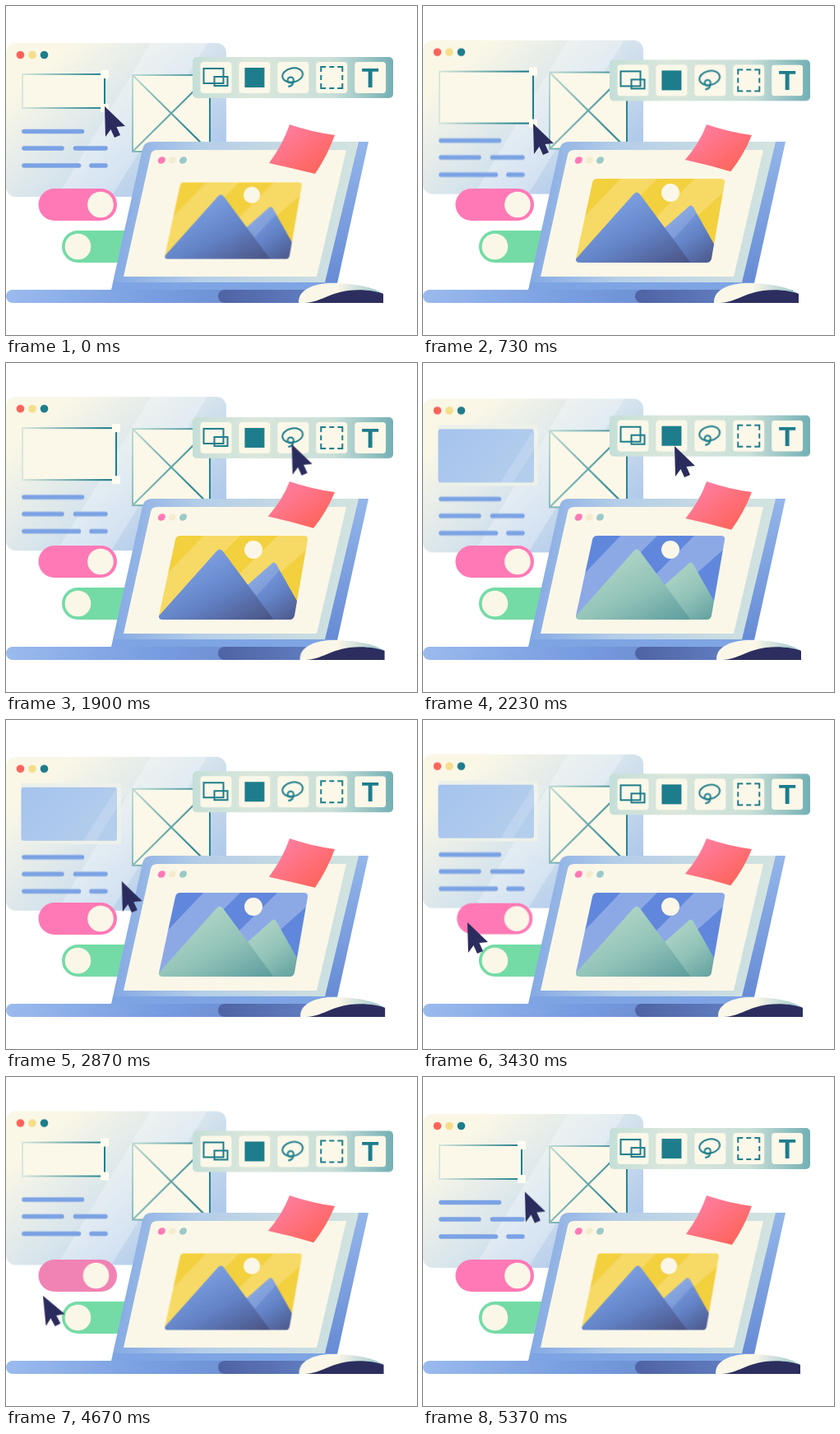
Animation, 500 px wide and 400 px high, one loop 5410 ms. Source, as an HTML page:

```html
<!DOCTYPE html>
<html lang="en">
<head>
<meta charset="utf-8">
<title>Design tools</title>
<style>
  html, body { margin: 0; width: 100%; height: 100%; overflow: hidden; background: #fff; }
  svg { display: block; width: 500px; height: 400px; }

  :root { --loop: 5410ms; --sine: cubic-bezier(.37, 0, .63, 1); }
  .loop { animation: var(--loop) ease-in-out infinite; }
  .bob { animation: 1352.5ms var(--sine) infinite alternate; }
  .mid { transform-box: fill-box; transform-origin: center; }

  /* Floating parts */
  .window { animation-name: window; }
  .bar { animation-name: bar; }
  .note { animation-name: note; }
  @keyframes window { from { transform: translateY(45px); } to { transform: translateY(39px); } }
  @keyframes bar { from { transform: translateY(62px); } to { transform: translateY(68px); } }
  @keyframes note {
    from { d: path("M345 144Q371 153 400 157Q391 182 376 204Q347 197 320 191Q337 168 345 144Z"); }
    to { d: path("M345 144Q371 153 400 157Q390 180 373 199Q346 190 318 184Q336 166 345 144Z"); }
  }

  /* Pointer and mouse */
  .cursor { animation-name: cursor; }
  @keyframes cursor {
    0%, 2% { transform: translate(120px, 122px); }
    12%, 14% { transform: translate(134px, 143px); }
    27.2% { transform: translate(470px, 92px); }
    28.8% { transform: translate(472px, 92px); }
    38.5%, 43% { transform: translate(306px, 101px); }
    60%, 64% { transform: translate(54px, 246px); }
    73.4%, 88% { transform: translate(45px, 266px) rotate(-4deg); }
    99.26% { transform: translate(124px, 140px); animation-timing-function: linear; }
    100% { transform: translate(120px, 122px); }
  }
  .mouse { animation-name: mouse; }
  @keyframes mouse {
    0%, 100% { transform: none; }
    13.5% { transform: translateX(-2px); }
    27.2% { transform: translateX(2.5px); }
    41.2% { transform: translateX(1px); }
    63.4% { transform: translateX(3px); }
    73.4% { transform: translateX(1px); }
  }

  /* Page layout inside the window */
  .page { animation-name: page; }
  @keyframes page {
    0%, 64.5% { transform: none; }
    69.4% { transform: translateY(-150px); }
    69.41% { transform: translateY(160px); animation-timing-function: ease-out; }
    73.4% { transform: translateY(48px); animation-timing-function: ease-out; }
    80%, 100% { transform: none; }
  }
  .frame { animation-name: frame; }
  @keyframes frame {
    0%, 2%, 69.41%, 100% { width: 100px; height: 41px; }
    12%, 69.4% { width: 114px; height: 63px; }
  }
  .grip { animation-name: grip; }
  .grip.top { animation-name: grip-top; }
  @keyframes grip {
    0%, 2%, 69.41%, 100% { transform: none; }
    12%, 69.4% { transform: translate(14px, 22px); }
  }
  @keyframes grip-top {
    0%, 2%, 69.41%, 100% { transform: none; }
    12%, 69.4% { transform: translateX(14px); }
  }
  .fill { animation-name: fill; }
  @keyframes fill {
    0%, 39.5%, 69.41%, 100% { opacity: 0; }
    41%, 69.4% { opacity: 1; }
  }
  .lines { animation-name: lines; }
  @keyframes lines {
    0%, 2%, 69.41%, 100% { transform: none; }
    12%, 69.4% { transform: translateY(14.5px); }
  }
  .lines path { transform-box: fill-box; transform-origin: left; animation-name: line; }
  @keyframes line {
    0%, 69.4% { transform: none; visibility: visible; }
    69.41%, 76% { transform: scaleX(0); visibility: hidden; }
    76.1% { transform: scaleX(0); visibility: visible; }
    84%, 100% { transform: none; visibility: visible; }
  }
  .box { transform-origin: 0 39px; animation-name: box; }
  @keyframes box {
    0%, 69.4% { transform: none; }
    69.41% { transform: scaleY(.6); }
    73.4% { transform: scaleY(.85); }
    80%, 100% { transform: none; }
  }

  /* Picture on the laptop */
  .picture { transform-origin: 276px 261px; animation-name: picture; }
  @keyframes picture {
    0%, 2%, 69%, 100% { transform: scale(.92); }
    12%, 65% { transform: none; }
  }
  .cool { animation-name: cool; }
  @keyframes cool {
    0%, 39.5%, 68.5%, 100% { opacity: 0; }
    41%, 65% { opacity: 1; }
  }

  /* Tools and switch */
  .tool { animation-name: tool; }
  @keyframes tool {
    0%, 22%, 31.5%, 100% { transform: none; }
    27% { transform: scale(1.14); }
  }
  .switch { animation-name: press; }
  @keyframes press {
    0%, 61.5%, 66%, 100% { transform: none; }
    63.4% { transform: scale(.965); }
  }
  .track { animation-name: track; }
  @keyframes track {
    0%, 64%, 87%, 100% { fill: #ff79b6; }
    67.5%, 84% { fill: #74dba6; }
  }
  .knob { animation-name: knob; }
  @keyframes knob {
    0%, 64%, 87%, 100% { transform: none; }
    67.5%, 84% { transform: translateX(-55px); }
  }
  .letter { font: bold 34px "Liberation Sans", Arial, sans-serif; text-anchor: middle; fill: #1d7d8c; }
</style>
</head>
<body>
<svg viewBox="0 0 500 400">
  <defs>
    <linearGradient id="pane" gradientUnits="userSpaceOnUse" x1="70" y1="10" x2="225" y2="190">
      <stop stop-color="#faf7e7"/><stop offset=".45" stop-color="#d8e5ec"/><stop offset="1" stop-color="#a6c3ec"/>
    </linearGradient>
    <linearGradient id="ink" gradientUnits="userSpaceOnUse" x1="19" y1="0" x2="122" y2="0">
      <stop stop-color="#d9e8dc"/><stop offset="1" stop-color="#1d7d8c"/>
    </linearGradient>
    <linearGradient id="ink2" gradientUnits="userSpaceOnUse" x1="153" y1="39" x2="240" y2="75">
      <stop stop-color="#c2ddd5"/><stop offset="1" stop-color="#2a8490"/>
    </linearGradient>
    <linearGradient id="block" x2="1" y2=".5">
      <stop stop-color="#a5c3ee"/><stop offset="1" stop-color="#b3cdec"/>
    </linearGradient>
    <linearGradient id="tray">
      <stop stop-color="#c5dfd8"/><stop offset=".3" stop-color="#dbe7dc"/><stop offset=".7" stop-color="#c9dfd8"/><stop offset="1" stop-color="#74b0b5"/>
    </linearGradient>
    <linearGradient id="bezel">
      <stop stop-color="#84a9e4"/><stop offset=".35" stop-color="#b4cde8"/><stop offset="1" stop-color="#d3e4df"/>
    </linearGradient>
    <linearGradient id="side" x1="0" x2="0" y1="0" y2="1">
      <stop stop-color="#94b6ea"/><stop offset="1" stop-color="#6489d4"/>
    </linearGradient>
    <linearGradient id="desk">
      <stop stop-color="#9bbbee"/><stop offset=".4" stop-color="#789de0"/><stop offset="1" stop-color="#5c78bd"/>
    </linearGradient>
    <linearGradient id="shade">
      <stop stop-color="#4f63a3"/><stop offset="1" stop-color="#6c8fd4"/>
    </linearGradient>
    <linearGradient id="peak" x1=".2" y1=".2" x2=".9" y2="1">
      <stop stop-color="#7ea3e6"/><stop offset=".5" stop-color="#6484c8"/><stop offset="1" stop-color="#4b5688"/>
    </linearGradient>
    <linearGradient id="peak2" x1=".2" y1=".2" x2=".9" y2="1">
      <stop stop-color="#b0d6c6"/><stop offset=".5" stop-color="#92c3b8"/><stop offset="1" stop-color="#609f9f"/>
    </linearGradient>
    <linearGradient id="paper" x1="0" y1="0" x2="1" y2="1">
      <stop offset=".1" stop-color="#ff7fa6"/><stop offset=".8" stop-color="#ff6660"/>
    </linearGradient>
    <linearGradient id="shell">
      <stop offset=".45" stop-color="#fbf7e8"/><stop offset=".9" stop-color="#a9cdcf"/>
    </linearGradient>
    <clipPath id="pane-clip"><rect width="268" height="187" rx="12"/></clipPath>
    <clipPath id="photo-clip">
      <path d="M212 210H362Q368 210 367 215L351 307Q350 312 345 312H191Q185 312 186 307L206 215Q207 210 212 210Z"/>
    </clipPath>
    <path id="big" d="M180 314L256 229Q260 224 264 229L327 314Z"/>
    <path id="small" d="M270 291L322 245Q326 240 329 245L360 300V314H300Z"/>
    <path id="sheen" d="M245 205H290L185 310H145ZM335 205H390L300 285H255Z"/>
  </defs>

  <g class="bob window">
    <g clip-path="url(#pane-clip)">
      <rect width="268" height="187" fill="url(#pane)"/>
      <path d="M176 0H245L128 187H62Z" fill="#fff" opacity=".28"/>
      <g class="loop page">
        <rect class="loop frame" x="20" y="38" width="100" height="41" fill="#fbf8e9" stroke="url(#ink)" stroke-width="2"/>
        <g fill="#fffdf2">
          <rect class="loop grip top" x="115" y="33" width="10" height="10"/>
          <rect class="loop grip" x="115" y="74" width="10" height="10"/>
        </g>
        <g class="loop fill">
          <path d="M18 32H140V106H18Z" fill="#edf1e9"/>
          <rect x="18.500" y="37" width="116.500" height="65" rx="3" fill="url(#block)"/>
          <path d="M151 37H135L94 102H110L135 62Z" fill="#fff" opacity=".15"/>
        </g>
        <g class="loop lines" fill="none" stroke="#7ba2e4" stroke-width="5.600" stroke-linecap="round">
          <path class="loop" d="M22 107.500H92.500"/>
          <path class="loop" d="M22 128H68M84.500 128H121"/>
          <path class="loop" d="M22 149H88.500M104 149H121"/>
        </g>
        <g class="loop box">
          <rect x="153" y="38" width="96" height="95" rx="2" fill="#fbf8e9"/>
          <path d="M154 39H248V132H154ZL248 132M248 39L154 132" fill="none" stroke="url(#ink2)" stroke-width="2"/>
        </g>
      </g>
      <circle cx="17.500" cy="14.500" r="4.800" fill="#ff6259"/>
      <circle cx="32" cy="14.500" r="4.800" fill="#f6dd8a"/>
      <circle cx="46.500" cy="14.500" r="4.800" fill="#1d7d8c"/>
    </g>
  </g>

  <g class="loop switch mid">
    <rect class="loop track" x="39.500" y="222" width="95.500" height="39" rx="19.500" fill="#ff79b6"/>
    <circle class="loop knob" cx="115" cy="241.500" r="15.800" fill="#fbf7e8"/>
  </g>
  <rect x="68" y="273" width="96" height="39" rx="19.500" fill="#74dba6"/>
  <circle cx="87.500" cy="292.500" r="15.800" fill="#fbf7e8"/>

  <g class="bob bar">
    <rect x="227" width="244" height="50" rx="5" fill="url(#tray)"/>
    <g id="tools" fill="none" stroke="#1d7d8c" stroke-width="2"></g>
  </g>

  <path d="M180 165H441L403 337V346H128Z" fill="url(#side)"/>
  <path d="M178 165H429L388 336H130L166 174Q168 165 178 165Z" fill="url(#bezel)"/>
  <path d="M184 175H414L378 329H143L176 181Q177 175 184 175Z" fill="#fbf7e8"/>
  <path d="M130 336H403V346H128Z" fill="#7ea4e4"/>
  <g transform="translate(0 187.500) skewX(-14)">
    <ellipse cx="189.300" rx="4.400" ry="4.300" fill="#ff79b6"/>
    <ellipse cx="202.300" rx="4.400" ry="4.300" fill="#f5ecd0"/>
    <ellipse cx="215.500" rx="4.400" ry="4.300" fill="#9ccac8"/>
  </g>

  <g class="loop picture">
    <g clip-path="url(#photo-clip)">
      <path d="M180 205H375V320H180Z" fill="#f3d03e"/>
      <use href="#sheen" fill="#fff" opacity=".2"/>
      <use href="#small" fill="url(#peak)"/>
      <path d="M293 271L322 245Q326 240 329 245L333 252L305 283Z" fill="#fff" opacity=".13"/>
      <use href="#big" fill="url(#peak)"/>
      <g class="loop cool">
        <path d="M180 205H375V320H180Z" fill="#6087dc"/>
        <use href="#sheen" fill="#fff" opacity=".28"/>
        <use href="#small" fill="url(#peak2)"/>
        <use href="#big" fill="url(#peak2)"/>
      </g>
      <circle cx="301" cy="227" r="11" fill="#fbf7e8"/>
    </g>
  </g>

  <path d="M8 345H450V361H8A8 8 0 0 1 8 345Z" fill="url(#desk)"/>
  <path d="M266 345H450V361H266A8 8 0 0 1 266 345Z" fill="url(#shade)"/>
  <g class="loop mouse">
    <path d="M356 361C355 344 376 337 397 337C425 337 447 342 459 350V361Z" fill="url(#shell)"/>
    <path d="M363 361C383 360 393 349 416 346C435 344 452 347 459 350V361Z" fill="#2c2e5f"/>
  </g>

  <path class="bob note" d="M345 144Q371 153 400 157Q391 182 376 204Q347 197 320 191Q337 168 345 144Z" fill="url(#paper)"/>
  <path class="loop cursor" d="M0 0L25 24L14.500 25L19 35L12 38L7.500 28L1 37Z" fill="#2b2c5e"/>
</svg>
<script>
  const icons = [
    '<path d="M-15 -11H9V7H-15ZM-2 -1H14V10H-2Z"/>',
    '<rect x="-12" y="-12" width="24" height="24" fill="#1d7d8c" stroke="none"/>',
    '<ellipse cy="-3" rx="12.5" ry="8.5" transform="rotate(-12)"/><circle cx="-3" cy="3" r="3.6"/><path d="M0 4Q1 10 -6 11"/>',
    '<path d="M-13 -7V-13H-7M7 -13H13V-7M13 7V13H7M-7 13H-13V7M-3 -13H3M13 -3V3M3 13H-3M-13 3V-3"/>',
    '<text class="letter" y="12" stroke="none">T</text>'
  ];
  // Each button swells just after its left neighbour.
  document.getElementById('tools').innerHTML = icons.map((icon, i) => `
    <g transform="translate(${255.5 + i * 46.9} 25)">
      <g class="loop tool" style="animation-delay:${(i - 4) * 100}ms">
        <rect x="-19" y="-19" width="38" height="38" rx="4" fill="#fbf8e9" stroke="none"/>${icon}
      </g>
    </g>`).join('');
</script>
</body>
</html>
```
